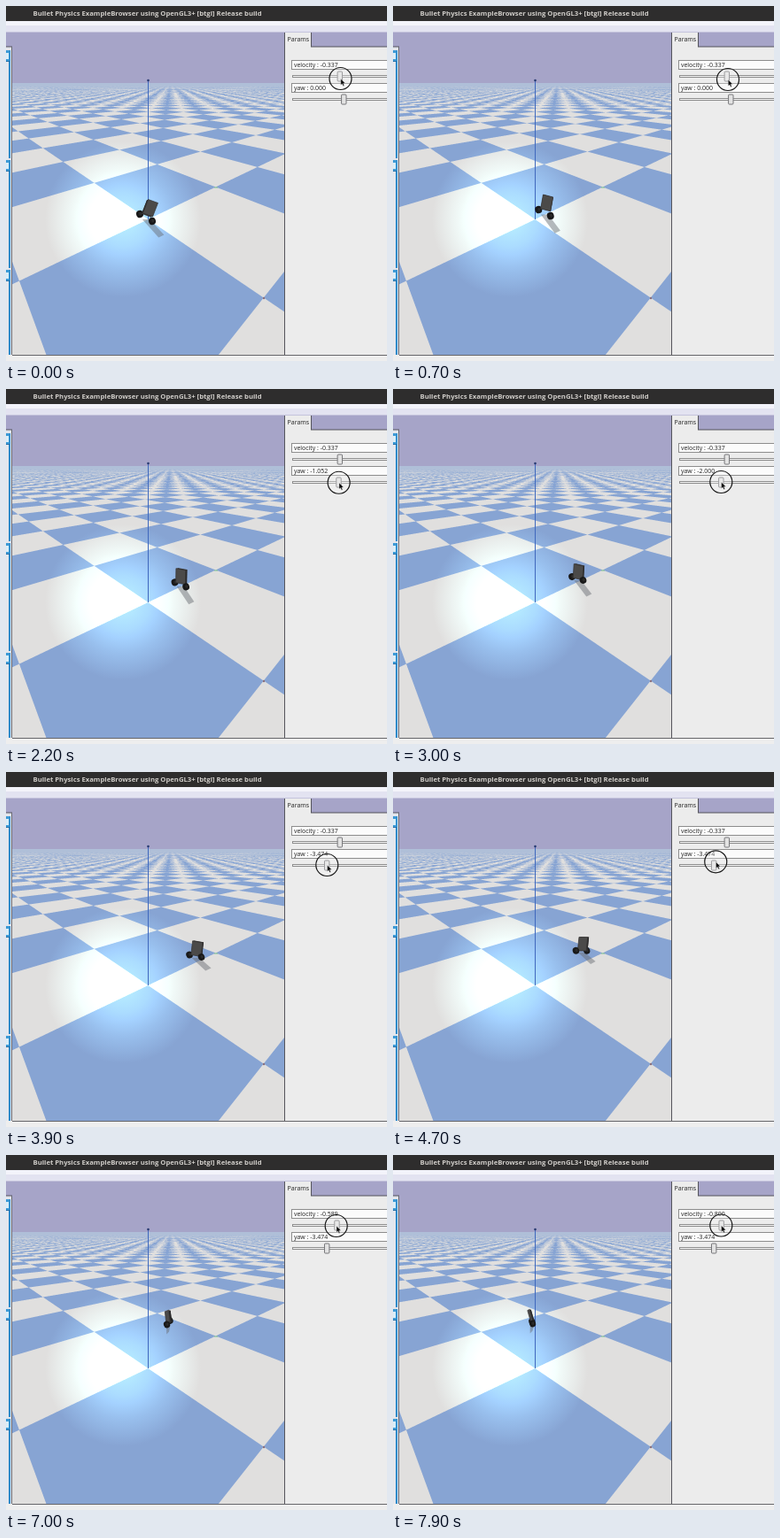
Recreate the animation shown at these times as an HTML page with a canvas. Size 430 by 401 pixels, loop 8 s.

```html
<!DOCTYPE html>
<html lang="en">
<head>
<meta charset="utf-8">
<title>Robot simulation</title>
<style>
html, body { margin: 0; width: 100%; height: 100%; overflow: hidden; background: #ececec; }
canvas { display: block; }
</style>
</head>
<body>
<canvas id="stage" width="430" height="401"></canvas>
<script>
const W = 430, H = 401, LOOP = 8000, STEP = 100;
const VIEW = { x: 7, y: 30, r: 314, b: 394 };
const HORIZON = 87, SKY = '#a6a4c8';
const ctx = document.getElementById('stage').getContext('2d');

const clamp = (v, a, b) => Math.max(a, Math.min(b, v));

function rect(c, color, x, y, w, h) {
  c.fillStyle = color;
  c.fillRect(x, y, w, h);
}

function poly(c, color, points) {
  c.fillStyle = color;
  c.beginPath();
  points.forEach(([x, y]) => c.lineTo(x, y));
  c.closePath();
  c.fill();
}

function text(c, str, x, y, size, color, weight = 400) {
  c.font = `${weight} ${size}px "Open Sans", "Noto Sans", sans-serif`;
  c.fillStyle = color;
  c.fillText(str, x, y);
}

function disc(c, color, x, y, rx, ry = rx, turn = 0) {
  c.fillStyle = color;
  c.beginPath();
  c.ellipse(x, y, rx, ry, turn, 0, Math.PI * 2);
  c.fill();
}

// Floor tile (1 = white, 0 = blue) seen through a screen point.
function tileAt(x, y) {
  const w = 1 / (y - HORIZON), w0 = 1 / 154;
  const dw = w - w0, dx = x * w - 160.3 * w0;
  const ai = 0.00202, aj = 0.00237, xi = 0.974, xj = -0.158;
  const det = ai * xj - aj * xi;
  const i = Math.floor((dw * xj - aj * dx) / det);
  const j = Math.floor((ai * dx - xi * dw) / det);
  return Math.abs(i + j) % 2;
}

function paintFloor(c) {
  const w = VIEW.r - VIEW.x, h = VIEW.b - HORIZON, n = 4;
  const img = c.createImageData(w, h);
  const blue = [135, 164, 211], white = [224, 223, 222];
  for (let y = 0; y < h; y++) {
    const detail = clamp((y - 2) / 9, 0, 1);
    for (let x = 0; x < w; x++) {
      let sum = 0;
      for (let s = 0; s < n * n; s++) {
        sum += tileAt(VIEW.x + x + (s % n + 0.5) / n, HORIZON + y + ((s / n | 0) + 0.5) / n);
      }
      const k = 0.45 + (sum / (n * n) - 0.45) * detail;
      const p = (y * w + x) * 4;
      for (let q = 0; q < 3; q++) img.data[p + q] = blue[q] + (white[q] - blue[q]) * k;
      img.data[p + 3] = 255;
    }
  }
  c.putImageData(img, VIEW.x, HORIZON);
}

function paintGlow(c) {
  c.save();
  c.beginPath();
  c.rect(VIEW.x, HORIZON, VIEW.r - VIEW.x, VIEW.b - HORIZON);
  c.clip();
  c.globalCompositeOperation = 'lighter';
  const g = c.createRadialGradient(132, 241, 0, 132, 241, 88);
  g.addColorStop(0, 'rgb(52,78,76)');
  g.addColorStop(0.35, 'rgb(36,56,54)');
  g.addColorStop(0.65, 'rgb(17,27,26)');
  g.addColorStop(1, 'rgb(0,0,0)');
  rect(c, g, 40, 150, 190, 190);
  c.restore();
}

function paintLeftDock(c) {
  rect(c, '#e4e6ec', 0, 46, 7, H - 46);
  rect(c, '#555560', 0, 45.5, 7, 1);
  for (const y of [50, 174, 298]) {
    rect(c, '#2f8ccb', 3, y, 2, 122);
    rect(c, '#3d9ad6', 0, y, 4, 13);
    rect(c, '#d9edf8', 0, y + 3, 3, 7);
    rect(c, '#286fa6', 0, y + 12, 4, 1);
  }
  rect(c, '#6a6a72', 6, 46, 1, VIEW.b - 46);
}

function paintPanel(c) {
  rect(c, '#ececec', VIEW.r, 46, W - VIEW.r, VIEW.b - 46);
  rect(c, '#ececec', VIEW.r, 30, 31, 17);
  rect(c, '#55555c', VIEW.r, 30, 1, VIEW.b - 30);
  rect(c, '#55555c', 344, 30, 1, 16);
  rect(c, '#55555c', 344, 45.5, W - 344, 1);
  text(c, 'Params', 317.5, 40, 7.05, '#222');
  rect(c, '#eeeeee', 0, VIEW.b, W, H - VIEW.b);
  rect(c, '#66666a', 7, VIEW.b, W - 7, 1);
}

function makeBackdrop() {
  const cv = document.createElement('canvas');
  cv.width = W;
  cv.height = H;
  const c = cv.getContext('2d');
  rect(c, SKY, 0, 0, W, H);
  rect(c, '#2e2d2d', 0, 0, W, 17);
  rect(c, '#f3f3fa', 0, 17, W, 5);
  rect(c, '#e3e3f1', 0, 22, W, 7.5);
  text(c, 'Bullet Physics ExampleBrowser using OpenGL3+ [btgl] Release build',
    30.5, 11.3, 7.7, '#cfccc8', 700);
  paintFloor(c);
  paintGlow(c);
  rect(c, '#3f68bd', 160, 84, 1, 157);
  disc(c, '#26386f', 160.5, 84, 1.3);
  rect(c, '#7fc48f', 235, 204.5, 4, 1);
  disc(c, '#8a6f7c', 291, 330, 1.2);
  paintLeftDock(c);
  paintPanel(c);
  return cv;
}

// Smooth interpolation of rows [time, ...values].
function track(rows, t, smooth) {
  let k = 0;
  while (k < rows.length - 2 && t >= rows[k + 1][0]) k++;
  const a = rows[k], b = rows[k + 1];
  const span = b[0] - a[0], u = clamp((t - a[0]) / span, 0, 1);
  const slope = (n, q) => {
    const p = rows[Math.max(0, n - 1)], r = rows[Math.min(rows.length - 1, n + 1)];
    return (r[q] - p[q]) / (r[0] - p[0]);
  };
  return a.slice(1).map((v, m) => {
    const q = m + 1;
    if (!smooth) return v + (b[q] - v) * u;
    const u2 = u * u, u3 = u2 * u;
    return v * (2 * u3 - 3 * u2 + 1) + b[q] * (3 * u2 - 2 * u3)
      + span * (slope(k, q) * (u3 - 2 * u2 + u) + slope(k + 1, q) * (u3 - u2));
  });
}

// time, top, bottom, half width, side depth, two wheels, shadow tip
const POSES = [
  [0,    166, 220.5, 160, 236, 5.5, 2,   -1.5, .8, 151, 235, 165, 243, 174, 260],
  [1400, 184.5, 208.8, 184, 225, 5.6, 1,  1.5, -.6, 177, 225, 190, 231, 195, 250],
  [3000, 209.5, 198.8, 208.5, 214.5, 5.3, 1.2, 1.3, -.5, 202, 212, 214.5, 216, 220, 233],
  [3900, 216.3, 191.8, 214.5, 207.5, 5.7, 1, 1, -.5, 207, 206.5, 220.5, 209, 227, 223],
  [5500, 209, 182, 208, 197, 3.9, -.8, 1.8, .2, 202.5, 197.5, 212.5, 195, 217, 209],
  [7000, 181.5, 176, 183, 189, 2.2, -.8, 2, .5, 181.5, 191.5, 185, 187, 182, 201],
  [7900, 153, 175, 157, 189, 1.2, -.6, 1.6, .4, 157.5, 190.5, 156.8, 188, 155.5, 200]
];

const YAW = [[1200, 0], [1400, -.105], [3000, -2], [3900, -3.474]];
const VELOCITY = [[5800, -.337], [7000, -.589], [7900, -.8]];
const POINTER = [
  [0, 377.5, 82], [700, 378, 83], [1200, 381, 106], [1400, 381, 106.5],
  [3000, 370.3, 105], [3900, 362.3, 105], [4600, 362.3, 105],
  [5300, 376, 79.5], [5800, 376, 79.5], [7000, 372.7, 80], [7900, 370.3, 79.5]
];

function drawRobot(t) {
  const [tx, ty, bx, by, hx, hy, dx, dy, lx, ly, rx, ry, sx, sy] = track(POSES, t, true);
  const size = 0.6 + (by - 189) / 120;
  const mx = (lx + rx) / 2, my = (ly + ry) / 2 + 2;
  const tip = Math.max(2, Math.abs(hx) * 0.8);
  const foot = Math.max(2.4, Math.abs(hx) * 0.75);
  poly(ctx, 'rgba(105,108,116,.48)', [
    [mx - foot, my], [mx + foot, my], [sx + tip, sy - 1.5], [sx - tip * .4, sy + 1.5]
  ]);
  const far = ly < ry ? [lx, ly] : [rx, ry];
  const near = ly < ry ? [rx, ry] : [lx, ly];
  const wheel = ([x, y]) => {
    disc(ctx, '#191919', x, y, 3 + size, 3.4 + size * .8, -.3);
    disc(ctx, '#2b2a29', x + .6, y - .4, 1.5, 1.8, -.3);
  };
  wheel(far);
  const corner = (x, y, s) => [x + hx * s, y + hy * s];
  const shift = ([x, y]) => [x + dx, y + dy];
  const face = [corner(tx, ty, -1), corner(tx, ty, 1), corner(bx, by, 1), corner(bx, by, -1)];
  const back = face.map(shift);
  const s = dx > 0 ? 1 : 0, e = dx > 0 ? 2 : 3;
  poly(ctx, '#393735', back);
  poly(ctx, '#2b2a2a', [face[s], back[s], back[e], face[e]]);
  poly(ctx, '#4b4a49', face);
  ctx.strokeStyle = '#333231';
  ctx.lineWidth = .7;
  ctx.stroke();
  wheel(near);
}

function drawSlider(label, value, y, scale) {
  rect(ctx, '#8d8d8d', 322, y, W - 322, 11);
  rect(ctx, '#fbfbfb', 323, y + 1, W - 323, 9);
  text(ctx, `${label} : ${value.toFixed(3)}`, 325, y + 7.6, 6.95, '#222');
  rect(ctx, '#8d8d8d', 323, y + 17, W - 323, 3);
  rect(ctx, '#f4f4f4', 324, y + 18, W - 324, 1);
  const x = 381.3 + value * scale;
  ctx.beginPath();
  ctx.roundRect(x - 2.7, y + 13, 5.4, 11, 1);
  ctx.fillStyle = '#e3e3e3';
  ctx.fill();
  ctx.strokeStyle = '#77777a';
  ctx.lineWidth = 1;
  ctx.stroke();
}

function drawPointer(x, y) {
  disc(ctx, 'rgba(245,245,245,.3)', x, y, 12.5);
  ctx.strokeStyle = '#161616';
  ctx.lineWidth = 1.2;
  ctx.stroke();
  const shape = [[0, 0], [0, 7], [1.6, 5.6], [2.8, 8.2], [4, 7.6], [2.9, 5.2], [5, 5]];
  poly(ctx, '#0c0c0c', shape.map(([a, b]) => [x + .3 + a, y + .3 + b]));
  ctx.strokeStyle = 'rgba(255,255,255,.65)';
  ctx.lineWidth = .5;
  ctx.stroke();
}

const backdrop = makeBackdrop();
const start = performance.now();

function frame(now) {
  const t = Math.floor((Math.max(0, now - start) % LOOP) / STEP) * STEP;
  ctx.drawImage(backdrop, 0, 0);
  drawRobot(t);
  drawSlider('velocity', track(VELOCITY, t)[0], 61, 13.3);
  drawSlider('yaw', track(YAW, t)[0], 87, 5.5);
  drawPointer(...track(POINTER, t));
  requestAnimationFrame(frame);
}
frame(start);
</script>
</body>
</html>
```
